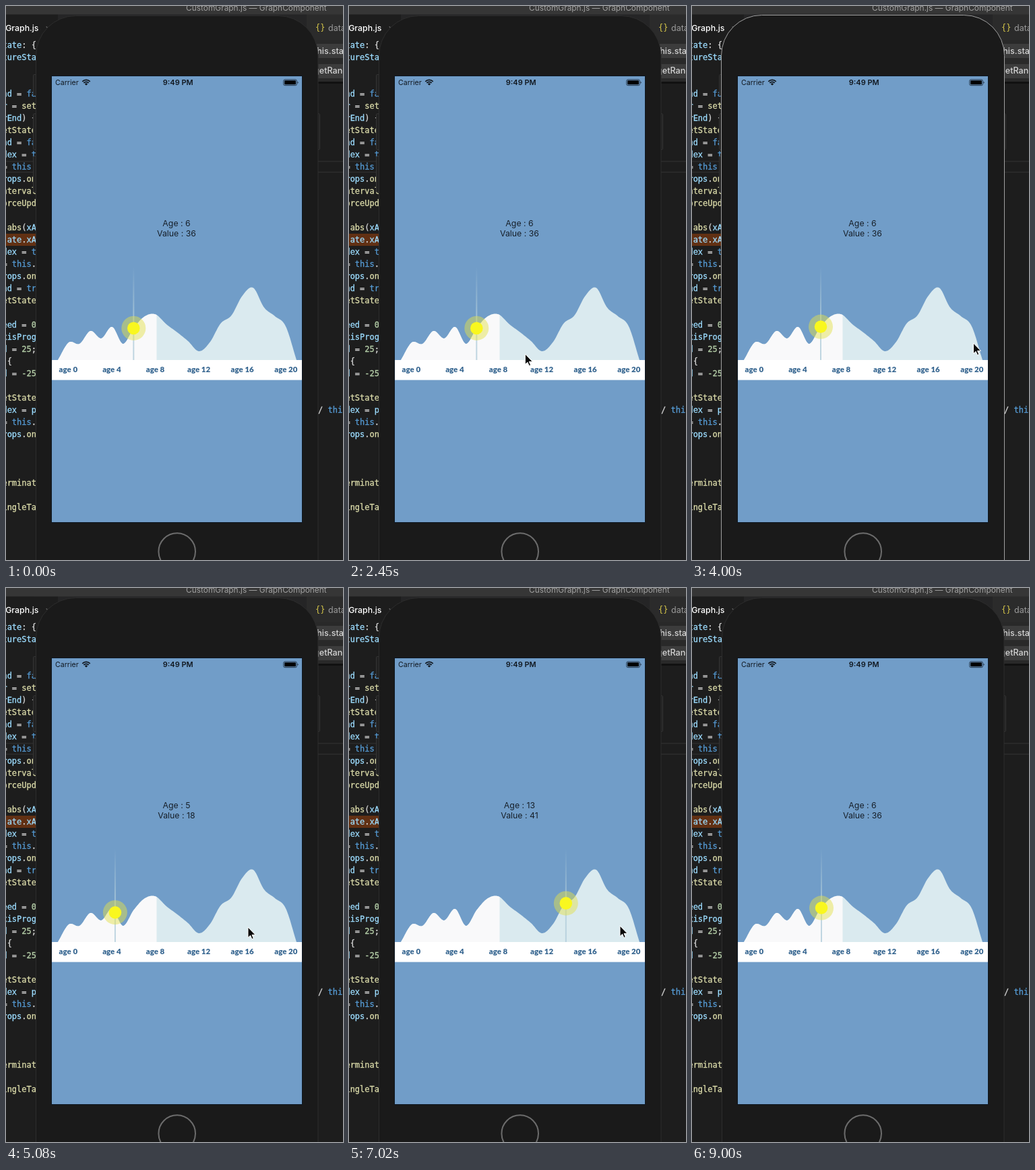
An HTML page for the animation above (9320 ms loop, 500 by 820 pixels).

```html
<!DOCTYPE html>
<html lang="en">
<head>
<meta charset="utf-8">
<title>Graph demo</title>
<style>
  html, body { margin: 0; width: 100%; height: 100%; overflow: hidden; background: #1d1d1d; }
  svg { display: block; }
  text { white-space: pre; }
  .ui { font-family: Inter, "Liberation Sans", sans-serif; }
  .code { font: 12px "DejaVu Sans Mono", monospace; stroke-width: .3px; }
  .axis { font: 900 11.5px Lato, sans-serif; fill: #34648f; text-anchor: middle; }
  .info { font-size: 12.3px; fill: #17202a; text-anchor: middle; }
</style>
</head>
<body>
<svg width="500" height="820" viewBox="0 0 500 820">
  <defs>
    <linearGradient id="fade" gradientUnits="userSpaceOnUse" x1="0" y1="386" x2="0" y2="524">
      <stop offset="0" stop-color="#b0ccda" stop-opacity="0"/>
      <stop offset=".5" stop-color="#b0ccda" stop-opacity=".7"/>
      <stop offset="1" stop-color="#b0ccda" stop-opacity=".8"/>
    </linearGradient>
    <clipPath id="past"><rect x="68" y="400" width="155.5" height="125"/></clipPath>
  </defs>

  <!-- editor -->
  <rect width="500" height="820" fill="#1d1d1d"/>
  <rect y="12" width="500" height="38" fill="#252526"/>
  <rect y="12" width="77" height="38" fill="#1d1d1d"/>
  <rect x="446" y="12" width="54" height="38" fill="#2b2b2b"/>
  <rect width="500" height="12.5" fill="#363636"/>
  <g class="ui">
    <text x="267" y="7" font-size="11.9" fill="#a0a0a0">CustomGraph.js — GraphComponent</text>
    <text x="48.5" y="37" font-size="12.3" font-weight="500" fill="#fff" text-anchor="end">CustomGraph.js</text>
    <text x="58" y="37" font-size="13" fill="#777">×</text>
    <text x="478" y="37" font-size="12.5" fill="#9a9a9a">data.js</text>
  </g>
  <text class="code" x="459" y="36" fill="#d8c84a">{}</text>
  <rect x="455" y="50" width="45" height="65" fill="#111"/>
  <rect x="455" y="50" width="45" height="62" fill="#292929"/>
  <rect x="455" y="56" width="45" height="21" fill="#3c3c3c"/>
  <rect x="455" y="86" width="45" height="21" fill="#3c3c3c"/>
  <g class="ui" font-size="12.6" font-weight="500" fill="#d4d4d4">
    <text x="457" y="71">this.state</text>
    <text x="457" y="100">getRange</text>
  </g>
  <path d="M0 230H500M0 246H500" stroke="#2c2c2c" stroke-width="1.5"/>
  <rect y="337" width="46" height="18" fill="#613013"/>
  <g class="code" id="code"></g>

  <!-- phone -->
  <g fill="#222" stroke="#343434">
    <rect x="40.5" y="101.5" width="6" height="31" rx="1"/>
    <rect x="40.5" y="159.5" width="6" height="53" rx="1"/>
    <rect x="40.5" y="222.5" width="6" height="53" rx="1"/>
    <rect x="460" y="159.5" width="5.5" height="53" rx="1"/>
  </g>
  <rect x="44.5" y="14.5" width="418.5" height="900" rx="59" fill="#1a1a1a" stroke="#2d2d2d"/>
  <rect id="focus" x="43.5" y="13.5" width="420" height="900" rx="60" fill="#1a1a1a" stroke="#a0a0a0"/>
  <circle cx="253.7" cy="807.5" r="27.3" fill="#1a1a1a" stroke="#6c6c6c" stroke-width="2"/>
  <rect x="67" y="103" width="373" height="662" fill="#0d1722"/>
  <rect x="68" y="104" width="371" height="660" fill="#719dc8"/>

  <!-- status bar -->
  <g class="ui" font-size="11" fill="#111820">
    <text x="73" y="117" font-size="10.6">Carrier</text>
    <text x="255.3" y="117" font-weight="600" text-anchor="middle">9:49 PM</text>
  </g>
  <path d="M113.3 111.8A8 8 0 0 1 124.7 111.8M115.3 113.9A5.2 5.2 0 0 1 122.7 113.9" fill="none" stroke="#10161d" stroke-width="1.7"/>
  <path d="M119 117.6L116.8 115.4A3.1 3.1 0 0 1 121.2 115.4Z" fill="#10161d"/>
  <rect x="411.8" y="109" width="19.6" height="8.6" rx="2" fill="none" stroke="#1d2c3b" stroke-width=".9"/>
  <rect x="413.2" y="110.3" width="16.8" height="6" rx=".8" fill="#000"/>
  <path d="M432.7 111.8Q434.6 113.3 432.7 114.8Z" fill="#10161d"/>

  <!-- graph -->
  <g class="ui info">
    <text id="age" x="253" y="326"></text>
    <text id="value" x="253" y="341.2"></text>
  </g>
  <path class="hill" fill="#daeaef"/>
  <path class="hill" fill="#f9f9fa" clip-path="url(#past)"/>
  <rect id="line" y="386" width="2" height="138" fill="url(#fade)"/>
  <rect x="68" y="524" width="371" height="29.6" fill="#fff"/>
  <g id="axis" class="axis"></g>
  <g id="dot">
    <circle r="18" fill="#e2e04a" fill-opacity=".48"/>
    <circle r="9.3" fill="#f9f71f"/>
  </g>

  <path id="cursor" d="M0 0V15.6L3.6 12.3L5.9 17.6L8.3 16.6L6 11.4H11Z" fill="#080808" stroke="#fff" stroke-width="1" stroke-linejoin="round"/>
</svg>
<script>
const LOOP = 9320;
const $ = id => document.getElementById(id);

function add(parent, name, attrs, text = '') {
  const el = document.createElementNS('http://www.w3.org/2000/svg', name);
  for (const k in attrs) el.setAttribute(k, attrs[k]);
  el.textContent = text;
  parent.append(el);
  return el;
}

// Code: each run is a colour letter and its text; blank rows stay blank
const inks = { v: '#9cdcfe', f: '#dcdcaa', k: '#569cd6', w: '#d4d4d4', n: '#b5cea8' };
function codeLine(x, y, runs) {
  const line = add($('code'), 'text', { x, y });
  for (const run of runs) {
    const ink = inks[run[0]];
    add(line, 'tspan', { fill: ink, stroke: ink }, run.slice(1));
  }
}
const code = `vtate|w: {
vtureSta


vnd|w = |kfa
vr|w = |fset
vrEnd|w) {
fetState
vnd|w = |kfa
vdex|w = |kt
w= |kthis|w.
vrops|w.|fon
fnterval
forceUpd

w |fabs|w(|vxA
w |vate|w.|vxA
vdex|w = |kt
w= |kthis|w.
vrops|w.|fon
vnd|w = |ktr
fetState

veed|w = |n0
vxisProg
vd|w = |n25|w;
w {
vd|w = |n-25

fetState
vdex|w = |vp
w= |kthis|w.
vrops|w.|fon



ferminat

fingleTa`;
code.split('\n').forEach((row, i) => row && codeLine(-5.6, 62 + 18 * i, row.split('|')));
codeLine(463, 602, ['w/ ', 'kthis']);

for (let i = 0; i < 6; i++)
  add($('axis'), 'text', { x: 92.3 + i * 64.6, y: 542.3 }, 'age ' + i * 4);

// Evenly spaced samples joined by a Catmull-Rom spline
const LEFT = 77, RIGHT = 431, BASE = 524;
const data = [0, 26, 24, 43, 32, 49, 24, 47.5, 64.5, 67.5, 53, 41, 28, 13, 26, 54, 66, 95, 107, 78, 65, 50, 0];
const last = data.length - 1;
const height = i => data[i] ?? -data[i < 0 ? 1 : last - 1];
const indexAt = x => (x - LEFT) / (RIGHT - LEFT) * last;

function hillY(x) {
  const i = Math.min(last - 1, Math.floor(indexAt(x)));
  const s = indexAt(x) - i;
  const [a, b, c, d] = [-1, 0, 1, 2].map(k => height(i + k));
  return BASE - (b + s / 2 * (c - a + s * (2 * a - 5 * b + 4 * c - d + s * (3 * (b - c) + d - a))));
}
let outline = `M${LEFT} ${BASE + 1}`;
for (let x = LEFT; x <= RIGHT; x++) outline += `L${x} ${hillY(x).toFixed(2)}`;
document.querySelectorAll('.hill').forEach(p => p.setAttribute('d', outline + `V${BASE + 1}Z`));

// Key poses: time, then coordinates
const pointer = [[760, 490, 725], [1680, 341, 516], [2450, 261, 515], [2760, 360, 508],
  [3400, 418, 499], [4680, 417, 499], [5080, 359, 502], [6000, 346, 501], [7020, 402, 500],
  [8560, 402, 500], [9000, 462, 825]];
const marker = [[2910, 189.3], [3400, 245], [4000, 191], [4760, 191], [5400, 133],
  [6000, 189.5], [7300, 358], [7850, 192]];

function at(poses, t) {
  const next = poses.findIndex(p => p[0] > t);
  if (next < 1) return poses.at(next).slice(1);
  const a = poses[next - 1], b = poses[next];
  const s = (t - a[0]) / (b[0] - a[0]);
  return a.slice(1).map((v, k) => v + (b[k + 1] - v) * s);
}

const show = (id, on) => { $(id).style.display = on ? '' : 'none'; };

function draw(t) {
  const [x] = at(marker, t);
  $('dot').setAttribute('transform', `translate(${x} ${hillY(x)})`);
  $('line').setAttribute('x', x - 1);

  // the label trails the marker slightly
  const index = Math.round(indexAt(at(marker, t - 60)[0]));
  $('age').textContent = 'Age : ' + Math.floor(index * 20 / last);
  $('value').textContent = 'Value : ' + Math.round(data[index] * .755);

  show('focus', t >= 2910 && t < 4800);
  show('cursor', t >= 760 && t < 9000);
  $('cursor').setAttribute('transform', `translate(${at(pointer, t).join(' ')})`);
}

function tick() {
  draw(performance.now() % LOOP);
  requestAnimationFrame(tick);
}
tick();
</script>
</body>
</html>
```
